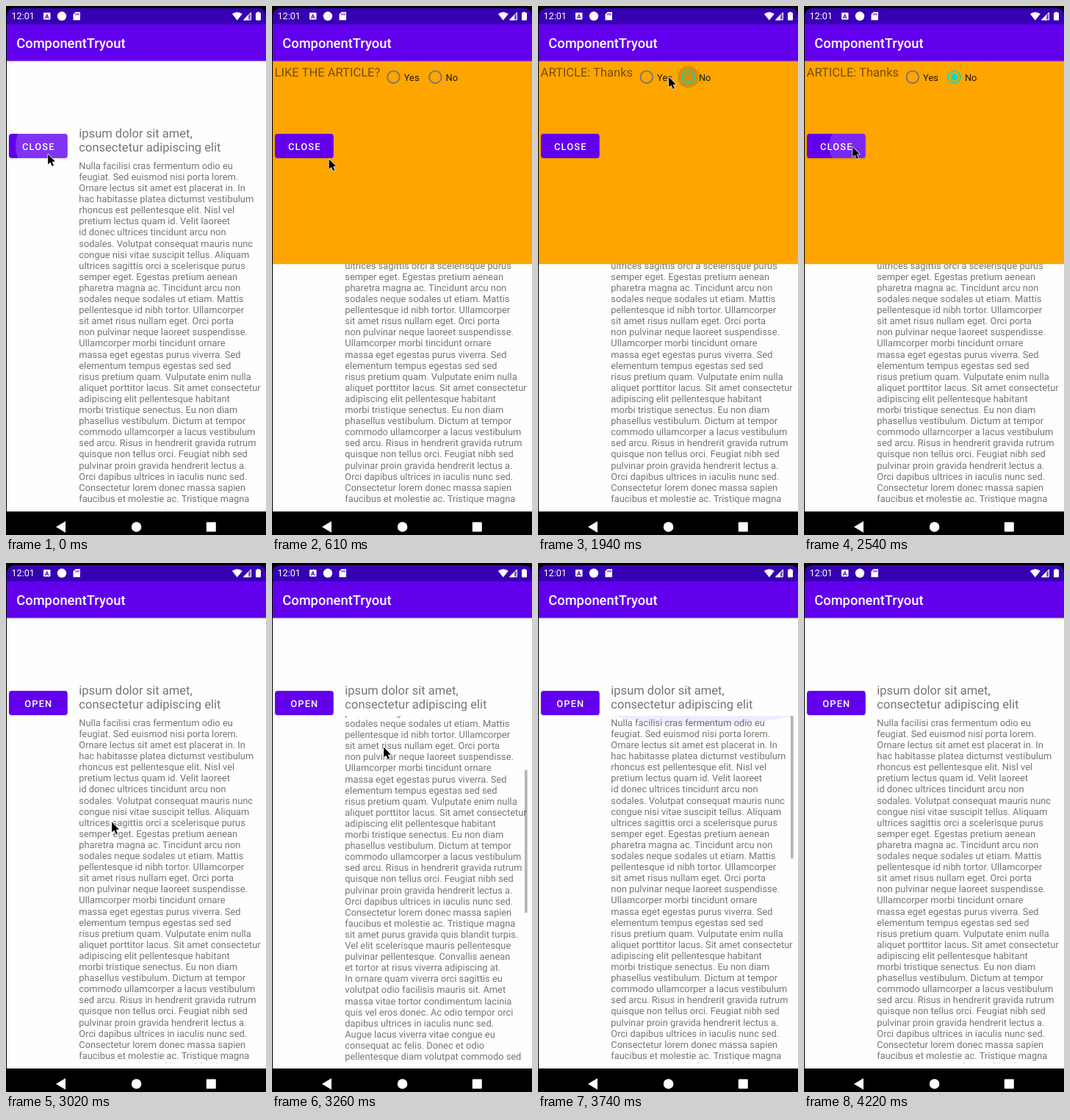
Animation of 354x720 px, one loop 5350 ms. Source, as an HTML page with a canvas:

```html
<!DOCTYPE html>
<html lang="en">
<head>
<meta charset="utf-8">
<title>Article demo</title>
<style>
html, body { margin: 0; width: 100%; height: 100%; overflow: hidden; background: #000; }
canvas { display: block; width: 354px; height: 720px; }
</style>
</head>
<body>
<canvas id="stage"></canvas>
<script>
const W = 354, H = 720, LOOP = 5350;
const canvas = document.getElementById('stage');
const ctx = canvas.getContext('2d');
const dpr = window.devicePixelRatio || 1;
canvas.width = W * dpr;
canvas.height = H * dpr;
ctx.textRendering = 'geometricPrecision';

const PURPLE = '#6200ee', TEAL = '#03dac5', GREY = '#757575';
const BODY = 12.87, LARGE = 16.54, LINE = 15.1;
const VIEW = { x: 99.5, y: 208, w: 248.5, h: 473 };
const CONTENT = 1153;
const BAR_END = 74.8, NAV_TOP = 688;

const ARTICLE = `Nulla facilisi cras fermentum odio eu
feugiat. Sed euismod nisi porta lorem.
Ornare lectus sit amet est placerat in. In
hac habitasse platea dictumst vestibulum
rhoncus est pellentesque elit. Nisl vel
pretium lectus quam id. Velit laoreet
id donec ultrices tincidunt arcu non
sodales. Volutpat consequat mauris nunc
congue nisi vitae suscipit tellus. Aliquam
ultrices sagittis orci a scelerisque purus
semper eget. Egestas pretium aenean
pharetra magna ac. Tincidunt arcu non
sodales neque sodales ut etiam. Mattis
pellentesque id nibh tortor. Ullamcorper
sit amet risus nullam eget. Orci porta
non pulvinar neque laoreet suspendisse.
Ullamcorper morbi tincidunt ornare
massa eget egestas purus viverra. Sed
elementum tempus egestas sed sed
risus pretium quam. Vulputate enim nulla
aliquet porttitor lacus. Sit amet consectetur
adipiscing elit pellentesque habitant
morbi tristique senectus. Eu non diam
phasellus vestibulum. Dictum at tempor
commodo ullamcorper a lacus vestibulum
sed arcu. Risus in hendrerit gravida rutrum
quisque non tellus orci. Feugiat nibh sed
pulvinar proin gravida hendrerit lectus a.
Orci dapibus ultrices in iaculis nunc sed.
Consectetur lorem donec massa sapien
faucibus et molestie ac. Tristique magna
sit amet purus gravida quis blandit turpis.
Vel elit scelerisque mauris pellentesque
pulvinar pellentesque. Convallis aenean
et tortor at risus viverra adipiscing at.
In ornare quam viverra orci sagittis eu
volutpat odio facilisis mauris sit. Amet
massa vitae tortor condimentum lacinia
quis vel eros donec. Ac odio tempor orci
dapibus ultrices in iaculis nunc sed.
Augue lacus viverra vitae congue eu
consequat ac felis. Donec et odio
pellentesque diam volutpat commodo sed
egestas. Egestas fringilla phasellus
faucibus scelerisque eleifend donec.`.split('\n');

// [time, x, y]
const POINTER = [
  [0, 57, 201], [250, 57, 201], [370, 60, 204], [490, 67, 207], [610, 77.4, 207.6],
  [740, 122, 162], [860, 171, 119], [980, 171, 100], [1100, 170.5, 95], [1460, 170.5, 95],
  [1580, 175, 95], [1700, 178, 96], [1940, 178, 96], [2060, 160, 117], [2180, 98, 164],
  [2300, 66, 191], [2660, 66, 191], [2780, 84, 232], [2900, 124, 312], [3020, 144, 352],
  [3140, 145, 290], [3260, 152, 250], [3380, 172, 420], [3500, 182, 546]
];
// [time, offset]
const SCROLL = [[3020, 0], [3140, 62], [3260, 180], [3380, 192], [3500, 66], [3620, 0]];

// The picture refreshes about every 120 ms.
function snap(t) {
  if (t < 120) return 0;
  if (t < 370) return 120;
  const base = t < 740 ? 370 : 740;
  return base + Math.floor((t - base) / 120) * 120;
}

function track(keys, t) {
  let i = 0;
  while (i < keys.length - 1 && keys[i + 1][0] <= t) i++;
  const a = keys[i], b = keys[Math.min(i + 1, keys.length - 1)];
  const p = b === a ? 0 : Math.max(0, (t - a[0]) / (b[0] - a[0]));
  return a.slice(1).map((v, n) => v + (b[n + 1] - v) * p);
}

function rect(x, y, w, h, color, r = 0) {
  ctx.fillStyle = color;
  ctx.beginPath();
  ctx.roundRect(x, y, w, h, r);
  ctx.fill();
}

function disc(x, y, r, color) {
  ctx.fillStyle = color;
  ctx.beginPath();
  ctx.arc(x, y, r, 0, Math.PI * 2);
  ctx.fill();
}

function poly(points, color) {
  ctx.beginPath();
  points.forEach(([x, y]) => ctx.lineTo(x, y));
  ctx.closePath();
  ctx.fillStyle = color;
  ctx.fill();
}

function text(str, x, y, size, color, weight = 400) {
  ctx.font = `${weight} ${size}px Roboto, sans-serif`;
  ctx.fillStyle = color;
  ctx.fillText(str, x, y);
}

function statusBar() {
  rect(1, 3, 353, 22, '#3700b3', [10, 10, 0, 0]);
  text('12:01', 7.4, 18, 12.7, '#fff');
  rect(51, 9, 9.5, 9.5, '#fff', 1);
  ctx.textAlign = 'center';
  text('A', 55.8, 16.7, 8, '#3700b3', 700);
  ctx.textAlign = 'left';
  disc(76, 13.8, 6.2, '#fff');
  poly([[94.5, 8.3], [101, 8.3], [101, 19.2], [91.5, 19.2], [91.5, 11.5]], '#fff');
  [94.5, 96.5, 98.5].forEach(x => rect(x, 10, 1, 2.5, '#3700b3'));

  ctx.fillStyle = '#fff';
  ctx.beginPath();
  ctx.moveTo(314.8, 19.5);
  ctx.lineTo(307.8, 10.8);
  ctx.quadraticCurveTo(314.8, 5.5, 321.8, 10.8);
  ctx.closePath();
  ctx.fill();
  poly([[334, 8], [334, 19.3], [323, 19.3]], 'rgba(255,255,255,.35)');
  poly([[330, 12], [330, 19.3], [323, 19.3]], '#fff');
  ctx.strokeStyle = '#fff';
  ctx.lineWidth = 1;
  ctx.beginPath();
  ctx.moveTo(323.8, 18.8);
  ctx.lineTo(333.5, 9);
  ctx.lineTo(333.5, 18.8);
  ctx.closePath();
  ctx.stroke();
  rect(340, 9, 7, 10.4, '#fff', 1);
  rect(342, 8, 3, 2, '#fff');
}

function navBar() {
  rect(0, NAV_TOP, W, H - NAV_TOP, '#000');
  poly([[68, 709], [81, 701.3], [81, 716.7]], '#fff');
  disc(177.6, 709, 6.8, '#fff');
  rect(272.8, 702.6, 13, 13, '#fff', 1);
}

function article(scroll, bar, glow) {
  text('ipsum dolor sit amet,', 99.3, 179, LARGE, GREY);
  text('consectetur adipiscing elit', 99.3, 198, LARGE, GREY);

  ctx.save();
  ctx.beginPath();
  ctx.rect(VIEW.x, VIEW.y, VIEW.w, VIEW.h);
  ctx.clip();
  ARTICLE.forEach((line, i) => {
    const y = 221.85 + i * LINE - scroll;
    if (y > VIEW.y - 5 && y < VIEW.y + VIEW.h + 9) text(line, 99.3, y, BODY, GREY);
  });
  if (glow) {
    ctx.fillStyle = `rgba(98,0,238,${glow * 0.14})`;
    ctx.beginPath();
    ctx.moveTo(VIEW.x, VIEW.y);
    ctx.quadraticCurveTo(VIEW.x + VIEW.w / 2, VIEW.y + 50 * glow, VIEW.x + VIEW.w, VIEW.y);
    ctx.fill();
  }
  if (bar) {
    const ratio = VIEW.h / CONTENT;
    rect(344, VIEW.y + scroll * ratio, 3.7, VIEW.h * ratio, `rgba(0,0,0,${0.29 * bar})`);
  }
  ctx.restore();
}

function radio(x, label, ring, dot, ripple) {
  if (ripple) disc(x, 96.7, 14.7, `rgba(100,85,40,${ripple})`);
  const color = ring ? TEAL : GREY;
  ctx.strokeStyle = color;
  ctx.lineWidth = 1.85;
  ctx.beginPath();
  ctx.arc(x, 96.7, 8.3, 0, Math.PI * 2);
  ctx.stroke();
  if (dot) disc(x, 96.7, 4.6 * dot, color);
  text(label, x + 14.3, 101.5, BODY, 'rgba(0,0,0,.87)');
}

function popup(t) {
  rect(1, 74, 353, 277.3, '#ffa500');
  const liked = t >= 1220, thanked = t >= 1940;
  const label = thanked ? 'ARTICLE: Thanks' : liked ? 'ARTICLE: Like' : 'LIKE THE ARTICLE?';
  const x = thanked ? 147.8 : liked ? 123.4 : 165.5;
  text(label, 3.6, 96, LARGE, 'rgba(0,0,0,.54)');

  const yesOn = liked && !thanked;
  const yesDot = yesOn ? Math.min(1, (t - 1220) / 240) : 0;
  const noDot = thanked ? Math.min(1, (t - 1940) / 240) : 0;
  const press = start => t === start ? 0.2 : t === start + 120 ? 0.28 : t === start + 240 ? 0.15 : 0;
  radio(x, 'Yes', yesOn, yesDot, press(1100));
  radio(x + 56.8, 'No', thanked, noDot, press(1820));
}

// ripple: { x, r, alpha }
function button(label, ripple) {
  ctx.save();
  ctx.shadowColor = 'rgba(0,0,0,.22)';
  ctx.shadowBlur = (ripple ? 3 : 1.5) * dpr;
  ctx.shadowOffsetY = 0.6 * dpr;
  rect(4, 174, 79.7, 33, PURPLE, 3.7);
  ctx.restore();
  if (ripple) {
    ctx.save();
    ctx.beginPath();
    ctx.roundRect(4, 174, 79.7, 33, 3.7);
    ctx.clip();
    disc(ripple.x, 190.5, ripple.r, `rgba(255,255,255,${ripple.alpha})`);
    ctx.restore();
  }
  ctx.textAlign = 'center';
  ctx.letterSpacing = '1.15px';
  text(label, 44.3, 195.6, BODY, '#fff', 500);
  ctx.letterSpacing = '0px';
  ctx.textAlign = 'left';
}

function pointer([x, y]) {
  ctx.save();
  ctx.translate(x, y);
  ctx.lineJoin = 'round';
  ctx.strokeStyle = '#fff';
  ctx.lineWidth = 1.3;
  poly([[0.2, 0.8], [0.2, 14.6], [3.4, 11.7], [5.8, 17], [8, 16], [5.7, 10.9], [9.7, 10.5]], '#000');
  ctx.stroke();
  ctx.fill();
  ctx.restore();
}

function draw(t) {
  ctx.setTransform(dpr, 0, 0, dpr, 0, 0);
  rect(0, 0, W, H, '#000');
  rect(1, 74, 353, NAV_TOP - 74, '#fefefe');

  const bar = t < 3140 || t >= 4220 ? 0 : t >= 4100 ? 0.5 : 1;
  const glow = t === 3620 ? 1 : t === 3740 ? 0.55 : 0;
  article(track(SCROLL, t)[0], bar, glow);
  if (t >= 120 && t < 2660) popup(t);

  const ripple = t === 0 ? { x: 57, r: 44, alpha: 0.2 }
    : t === 2540 ? { x: 66, r: 32, alpha: 0.16 }
    : t === 2660 ? { x: 60, r: 44, alpha: 0.2 } : null;
  button(t < 2660 ? 'CLOSE' : 'OPEN', ripple);

  const shade = ctx.createLinearGradient(0, BAR_END, 0, BAR_END + 2);
  shade.addColorStop(0, 'rgba(0,0,0,.18)');
  shade.addColorStop(1, 'rgba(0,0,0,0)');
  rect(1, BAR_END, 353, 2, shade);
  rect(1, 24, 353, BAR_END - 24, PURPLE);
  text('ComponentTryout', 14.2, 57, 18.38, '#fff', 500);
  statusBar();
  navBar();
  if (t < 3620) pointer(track(POINTER, t));
}

const begin = performance.now();
function tick() {
  draw(snap((performance.now() - begin) % LOOP));
  requestAnimationFrame(tick);
}
tick();
</script>
</body>
</html>
```
